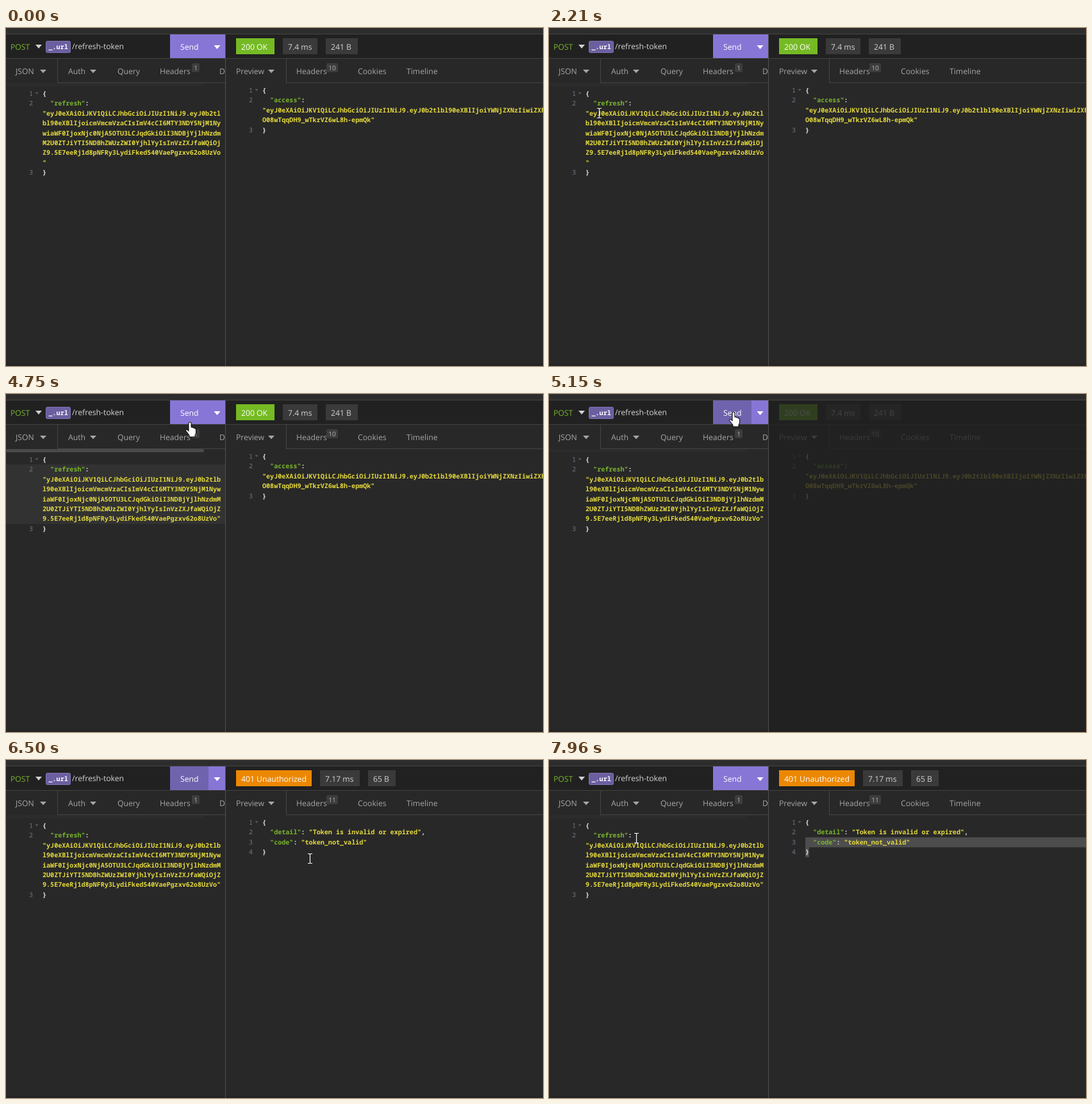
These frames come from a looping animation (838 by 528 pixels, 8000 ms). An HTML page:

```html
<!DOCTYPE html>
<html lang="en">
<head>
<meta charset="utf-8">
<title>Refresh token request</title>
<style>
  html, body { margin: 0; width: 100%; height: 100%; overflow: hidden; background: #282828; }
  svg { display: block; width: 838px; height: 528px; }
  text { font: 12.2px "Open Sans", "Noto Sans", sans-serif; fill: #a6a6a6; white-space: pre; text-rendering: geometricPrecision; }
  .mono { font: 700 10.08px "Noto Sans Mono", "DejaVu Sans Mono", monospace; fill: #e8e8e8; }
  .num { font-weight: 400; fill: #77728a; }
  .key { fill: #7ab52d; }
  .str { fill: #e4d93d; }
  .badge { font-size: 10px; fill: #b4b4b4; }
  .light { fill: #d4d4d4; }
  .white { fill: #fff; }
  .status { font-weight: 500; fill: #fff; }
</style>
</head>
<body>
<svg id="stage" viewBox="0 0 838 528"></svg>
<script>
const LOOP = 8000;
const ROW = 15.4;
const WRAP = 46;
const TOKEN = 'eyJ0eXAiOiJKV1QiLCJhbGciOiJIUzI1NiJ9.' +
  'eyJ0b2tlbl90eXBlIjoicmVmcmVzaCIsImV4cCI6MTY3NDY5NjM1Ny' +
  'wiaWF0IjoxNjc0NjA5OTU3LCJqdGkiOiI3NDBjYjlhNzdm' +
  'M2U0ZTJiYTI5NDBhZWUzZWI0YjhlYyIsInVzZXJfaWQiOj' +
  'Z9.5E7eeRj1d8pNFRy3LydiFked540VaePgzxv62o8UzVo';
const ACCESS = ['"eyJ0eXAiOiJKV1QiLCJhbGciOiJIUzI1NiJ9.eyJ0b2tlbl90eXBlIjoiYWNjZXNzIiwiZXhw',
  'O08wTqqDH9_wTkrVZ6wL8h-epmQk"'];

// Moments of user actions and replies, in ms
const FOCUS = 2900, ERASE = 4060, SEND = 4890, REPLY = 5900, BLUR = 6640;

const rect = (x, y, w, h, fill, more = '') =>
  `<rect x="${x}" y="${y}" width="${w}" height="${h}" fill="${fill}" ${more}/>`;
const text = (x, y, content, cls = '') => `<text x="${x}" y="${y}" class="${cls}">${content}</text>`;
const caret = (x, y, w, h, fill = '#a6a6a6') => `<path d="M${x} ${y}h${w}l${-w / 2} ${h}z" fill="${fill}"/>`;
const span = (cls, content) => `<tspan class="${cls}">${content}</tspan>`;
const group = (id, content) => `<g id="${id}">${content}</g>`;
const badge = (x, w, label) =>
  rect(x, 55, w, 14, '#3d3d3d', 'rx="2"') + text(x + 3.2, 66, label, 'badge');
const tag = (x, w, label, fill = '#3a3a3a', cls = 'light') =>
  rect(x, 16, w, 25, fill) + text(x + 8, 33.5, label, cls);

// rows: [line number or '', markup]
function code(x, numberX, y, rows) {
  return caret(numberX + 9.5, y - 5.5, 5, 3, '#5c5c5c') + rows.map(([number, markup], i) => {
    const base = y + i * ROW;
    return text(numberX, base, number, 'mono num') + text(x, base, markup, 'mono');
  }).join('');
}

function requestBody(token) {
  const lines = `"${token}"`.match(new RegExp(`.{1,${WRAP}}`, 'g'));
  return code(57, 36, 106, [
    [1, '{'],
    [2, '  ' + span('key', '"refresh"') + ':'],
    ...lines.map(line => ['', span('str', line)]),
    [3, '}']
  ]);
}

const accepted = tag(359, 60, '200 OK', '#75ba24', 'status') + tag(432, 54, '7.4 ms') + tag(499, 50, '241 B') +
  badge(500, 18, '10') + code(400, 379, 101, [
    [1, '{'],
    [2, '  ' + span('key', '"access"') + ':'],
    ['', span('str', ACCESS[0])],
    ['', span('str', ACCESS[1])],
    [3, '}']
  ]);

const selection = [438, 438, 438, 6]
  .map((w, i) => rect(400, 90 + i * ROW, w, ROW + 0.2, '#4d4d4d', 'class="selected"')).join('');

const rejected = tag(359, 118, '401 Unauthorized', '#ec8702', 'status') + tag(490, 62, '7.17 ms') + tag(565, 43, '65 B') +
  badge(500, 18, '11') + selection + code(400, 379, 101, [
    [1, '{'],
    [2, '  ' + span('key', '"detail"') + ': ' + span('str', '"Token is invalid or expired"') + ','],
    [3, '  ' + span('key', '"code"') + ': ' + span('str', '"token_not_valid"')],
    [4, '}']
  ]);

const hand = 'M-2 2Q-2 0 0 0Q2 0 2 2V8Q4 7 5 9Q7 8 7.5 10Q9.5 9.5 9.5 12V17Q9 19 8 20.5V23H-1V20.5L-6 14' +
  'Q-7 11.5 -5 11.5Q-3.5 12 -2 14Z';
const beam = 'M-3.5 -7.5H-1L0 -6.5L1 -7.5H3.5M-3.5 7.5H-1L0 6.5L1 7.5H3.5M0 -6.5V6.5';

const stage = document.getElementById('stage');
stage.innerHTML =
  rect(0, 0, 838, 528, '#282828') +
  rect(0, 0, 838, 9, '#2d2d2d') +
  rect(0, 10, 838, 37, '#212121') +
  group('activeLine', rect(0, 110, 342, 93, '#323232', 'id="activeBox"')) +
  rect(0, 86, 309, 5, '#4a4a4a', 'id="scrollbar" rx="2"') +
  // request side
  text(7, 33.5, 'POST', 'key') + caret(46, 26, 10, 6, '#d0d0d0') +
  rect(62.5, 20.5, 38, 18, '#6c5fa0', 'rx="2" stroke="#7e72b0"') +
  text(66.5, 33, '_.url', 'mono white') + text(103, 33, '/refresh-token', 'light') +
  rect(256, 10, 60, 37, '#8776d5', 'id="sendButton"') + rect(316, 10, 26, 37, '#8776d5') +
  text(272, 34, 'Send', 'white') + caret(324.5, 27, 10, 6, '#fff') +
  text(15, 72, 'JSON') + caret(53, 65, 10, 5.5) +
  text(97, 72, 'Auth') + caret(131, 65, 10, 5.5) +
  text(174, 72, 'Query') + text(240, 72, 'Headers') + badge(290, 12, '1') + text(333, 72, 'D') +
  group('fullBody', requestBody(TOKEN)) + group('cutBody', requestBody(TOKEN.slice(1))) +
  // response side
  rect(342, 48, 496, 480, '#282828') + 
  text(359, 72, 'Preview') + caret(409, 65, 10, 5.5) +
  text(453, 72, 'Headers') + text(549, 72, 'Cookies') + text(625, 72, 'Timeline') +
  group('accepted', accepted) + group('rejected', rejected) +
  // frame lines
  rect(0, 524, 838, 4, '#242424') +
  rect(0, 47, 838, 1, '#424242') +
  rect(80, 48, 1, 38, '#454545') + rect(80, 85, 262, 1, '#454545') +
  rect(437, 48, 1, 38, '#454545') + rect(437, 85, 401, 1, '#454545') +
  rect(343, 10, 495, 518, '#202020', 'id="shade"') +
  rect(0, 9, 838, 1, '#444') + rect(342, 10, 1, 518, '#505050') +
  group('cursor',
    `<path id="hand" d="${hand}" fill="#fff" stroke="#111" stroke-width="1.1" stroke-linejoin="round"/>` +
    `<path id="beam" d="${beam}" fill="none" stroke="#f2f2f2" stroke-width="1.2"/>`);

const el = id => document.getElementById(id);
const show = (node, on) => node.setAttribute('visibility', on ? 'visible' : 'hidden');
const clamp = v => Math.min(1, Math.max(0, v));
const ramp = (t, from, to) => clamp((t - from) / (to - from));
const selected = [...document.querySelectorAll('.selected')];

// Pointer path: [time, x, y]
const path = [
  [660, 680, 495], [1440, 137.5, 188],
  [1510, 137.5, 188], [2210, 78.5, 133],
  [2410, 78.5, 133], [2750, 60, 125],
  [2900, 60, 125], [3390, 183, 190],
  [3720, 183, 190], [3850, 235, 178], [4470, 262, 80],
  [4540, 262, 80], [4750, 287, 44], [5150, 288, 28],
  [6290, 288, 28], [6500, 474.5, 154], [6640, 508, 205],
  [7060, 40, 62], [7460, 40, 62], [7960, 136.5, 122]
];

function pointer(t) {
  const next = path.findIndex(p => p[0] > t);
  if (next < 0) return path[path.length - 1].slice(1);
  if (next === 0) return path[0].slice(1);
  const [t0, x0, y0] = path[next - 1], [t1, x1, y1] = path[next];
  const u = ramp(t, t0, t1), k = u * u * (3 - 2 * u);
  return [x0 + (x1 - x0) * k, y0 + (y1 - y0) * k];
}

function render(t) {
  const [x, y] = pointer(t);
  const isHand = t >= 4540 && t < 6290 || t >= 6290 && t < 6500 && x < 343;
  el('cursor').setAttribute('transform', `translate(${x.toFixed(2)} ${y.toFixed(2)})`);
  show(el('hand'), t >= 660 && isHand);
  show(el('beam'), t >= 660 && !isHand);

  const erased = t >= ERASE;
  show(el('fullBody'), !erased);
  show(el('cutBody'), erased);
  show(el('activeLine'), t >= FOCUS && t < SEND);
  el('activeBox').setAttribute('height', erased ? 93 : 108);
  el('scrollbar').setAttribute('opacity', t >= ERASE && t < SEND ? 1 : 0.12);
  el('sendButton').setAttribute('fill', t >= SEND && t < BLUR ? '#7063ae' : '#8776d5');

  const replied = t >= REPLY;
  show(el('accepted'), !replied);
  show(el('rejected'), replied);
  el('shade').setAttribute('opacity', 0.8 * (ramp(t, SEND, 5150) - ramp(t, REPLY, 6030)));

  // Dragging upward selects each line the pointer passes
  selected.forEach((node, i) => show(node, t > BLUR && y < 90 + (i + 1) * ROW));
}

function tick(now) {
  render(now % LOOP);
  requestAnimationFrame(tick);
}
render(0);
requestAnimationFrame(tick);
</script>
</body>
</html>
```
